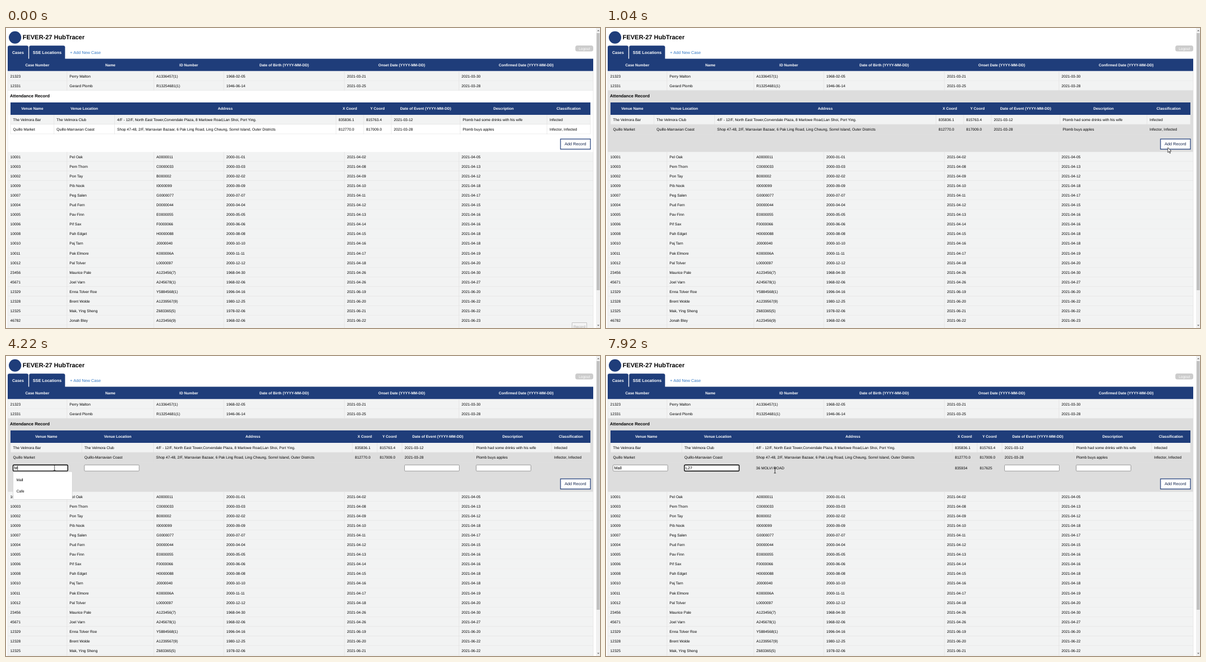
Animation, 1053 px wide and 532 px high, one loop 8000 ms. Source, as an HTML page with a canvas:

```html
<!DOCTYPE html>
<html lang="en">
<head>
<meta charset="utf-8">
<title>Case table</title>
<style>
html, body { margin: 0; width: 100%; height: 100%; overflow: hidden; background: #fff; }
canvas { display: block; }
</style>
</head>
<body>
<canvas id="stage" width="1053" height="532"></canvas>
<script>
const ctx = document.getElementById('stage').getContext('2d');
const LOOP = 8000, STEP = 70;
const NAVY = '#1f3d7a', ROW = '#f2f3f3', GRAY = '#ddd';
const SMALL = 6.58, MEDIUM = 7.31, ROW_H = 17.08;
const DETAIL_TOP = 110.7, FORM_TOP = 188.4, FORM_END = 209.6;

const caseEdges = [3, 108, 262, 386, 600, 803, 1041];
const caseHeads = ['Case Number', 'Name', 'ID Number', 'Date of Birth (YYYY-MM-DD)',
  'Onset Date (YYYY-MM-DD)', 'Confirmed Date (YYYY-MM-DD)'];
const cases = `21323|Perry Malton|A1336457(1)|1968-02-05|2021-03-21|2021-03-30
12331|Gerard Plomb|R13254681(1)|1946-06-14|2021-03-25|2021-03-28
10001|Pel Oak|A0000011|2000-01-01|2021-04-02|2021-04-05
10003|Pem Thorn|C0000033|2000-03-03|2021-04-08|2021-04-13
10002|Pon Tay|B000002|2000-02-02|2021-04-09|2021-04-12
10009|Pib Nook|I0000099|2000-09-09|2021-04-10|2021-04-18
10007|Peg Salen|G0000077|2000-07-07|2021-04-11|2021-04-17
10004|Pud Fern|D0000044|2000-04-04|2021-04-12|2021-04-15
10005|Pav Finn|E0000055|2000-05-05|2021-04-13|2021-04-16
10006|Pif Sax|F0000066|2000-06-06|2021-04-14|2021-04-16
10008|Pah Edget|H0000088|2000-08-08|2021-04-15|2021-04-18
10010|Paj Tarn|J0000040|2000-10-10|2021-04-16|2021-04-18
10011|Pak Elmore|K000006A|2000-11-11|2021-04-17|2021-04-19
10012|Pal Tolver|L0000097|2000-12-12|2021-04-18|2021-04-20
23456|Maurice Pale|A123456(7)|1968-04-30|2021-04-26|2021-04-30
45671|Joel Varn|A245678(1)|1968-02-06|2021-04-26|2021-04-27
12329|Enna Tolver Roe|Y5884568(1)|1996-04-16|2021-06-19|2021-06-20
12328|Brent Wolde|A1239567(9)|1980-12-25|2021-06-20|2021-06-22
12325|Mak, Ying Sheng|Z683365(5)|1978-02-06|2021-06-21|2021-06-22
46782|Jonah Bley|A123456(9)|1968-02-06|2021-06-22|2021-06-23
| | | | | `.split('\n').map(line => line.split('|'));

const venueHeads = ['Venue Name', 'Venue Location', 'Address', 'X Coord', 'Y Coord',
  'Date of Event (YYYY-MM-DD)', 'Description', 'Classification'];
const venues = [
  ['The Velmora Bar', 'The Velmora Club',
    '4/F - 12/F, North East Tower,Corvendale Plaza, 8 Marlowe Road,Lan Shoi, Port Ying.',
    '835836.1', '815763.4', '2021-03-12', 'Plomb had some drinks with his wife', 'Infected'],
  ['Quillo Market', 'Quillo-Marravian Coast',
    'Shop 47-48, 2/F, Marravian Bazaar, 6 Pak Ling Road, Ling Cheung, Sorrel Island, Outer Districts',
    '812770.0', '817009.0', '2021-03-28', 'Plomb buys apples', 'Infector, Infected']];
const closedEdges = [8, 85, 192.5, 585, 634, 683, 805, 959, 1036];
const openEdges = [8, 134.5, 261.5, 614, 658, 702, 829, 967, 1036];

// Pointer moves: start time, then one position per step.
const moves = [
  [270, [[785, 526], [800, 490], [816, 448], [832, 407], [852, 375], [872, 343], [892, 308],
    [912, 273], [929, 242], [952, 231], [977, 221], [996, 212]]],
  [1110, [[1003, 209], [1007, 208]]],
  [2240, [[1004, 211], [960, 214], [860, 208], [700, 196], [540, 184], [400, 177], [260, 173],
    [160, 178], [105, 187], [84.5, 192.3]]],
  [3140, [[86, 198]]],
  [7170, [[98, 202], [125, 210], [165, 216], [205, 217], [245, 213], [275, 208], [292, 204], [299.5, 203]]]];
const clicks = [[1440, 1520], [3070, 3140]];

// Form edits: time, field, value.
const edits = [[3290, 0, ''], [4220, 0, 'M'], [4490, 0, 'Ma'], [4620, 0, 'Mal'], [4820, 0, 'Mall'],
  [5030, 1, ''], [5760, 1, 'L'], [6160, 1, 'L2'], [6300, 1, 'L27']];
const popups = [[3350, 4290, 0, ['Mall', 'Cafe']], [4290, 4890, 0, ['Mall']], [5760, 6430, 1, ['L27']]];

function rect(x, y, x2, y2, color) {
  ctx.fillStyle = color;
  ctx.fillRect(x, y, x2 - x, y2 - y);
}

function box(x, y, x2, y2, radius, fill, stroke, width = 0.6) {
  ctx.beginPath();
  ctx.roundRect(x, y, x2 - x, y2 - y, radius);
  ctx.fillStyle = fill;
  ctx.fill();
  if (!stroke) return;
  ctx.strokeStyle = stroke;
  ctx.lineWidth = width;
  ctx.stroke();
}

function text(str, x, middle, { size = SMALL, bold = false, color = '#000', align = 'left' } = {}) {
  ctx.font = `${bold ? 'bold ' : ''}${size}px "Liberation Sans", Arial, sans-serif`;
  ctx.textRendering = 'geometricPrecision';
  ctx.textAlign = align;
  ctx.fillStyle = color;
  ctx.fillText(str, x, middle + size * 0.36);
}

function headRow(heads, edges, y, y2) {
  rect(edges[0], y, edges.at(-1), y2, NAVY);
  heads.forEach((head, i) => text(head, (edges[i] + edges[i + 1]) / 2, (y + y2) / 2,
    { bold: true, color: '#fff', align: 'center' }));
}

function bodyRow(cells, edges, y, fill) {
  const left = edges[0], right = edges.at(-1);
  if (fill) rect(left, y, right, y + ROW_H, fill);
  rect(left, y + ROW_H - 0.5, right, y + ROW_H, GRAY);
  edges.forEach(x => rect(x - 0.3, y, x + 0.3, y + ROW_H, GRAY));
  cells.forEach((cell, i) => text(cell, edges[i] + 4.6, y + ROW_H / 2));
}

function pointerAt(t) {
  const move = moves.findLast(([start]) => t >= start);
  if (!move) return null;
  const [start, points] = move;
  return points[Math.min(points.length - 1, Math.floor((t - start) / STEP))];
}

function drawPage(open) {
  box(5, 5.7, 27, 27.7, 11, NAVY);
  text('FEVER-27 HubTracer', 29.5, 16.4, { size: 10.97, bold: true });
  const tab = { size: MEDIUM * 0.96, bold: true, color: '#fff', align: 'center' };
  box(3, 31.2, 39.7, 55, [3, 3, 0, 0], NAVY);
  box(41, 31.2, 104.7, 55, [3, 3, 0, 0], NAVY);
  text('Cases', 21.3, 43, tab);
  text('SSE Locations', 73, 43, { ...tab, size: MEDIUM });
  text('+ Add New Case', 113.5, 43.2, { size: MEDIUM, color: '#3077c4' });
  box(1009.3, 31, 1041, 41.6, 3.5, '#ccc');
  text('Logout', 1025.2, 36.4, { color: '#fff', align: 'center' });

  rect(1046, 0, 1053, 532, '#f1f1f1');
  rect(1047, 9, 1052.5, open ? 450 : 465, '#c1c1c1');
  for (const [y, dir] of [[4.5, -1], [527.5, 1]]) {
    ctx.beginPath();
    ctx.moveTo(1048, y - dir);
    ctx.lineTo(1052, y - dir);
    ctx.lineTo(1050, y + dir);
    ctx.fillStyle = '#606060';
    ctx.fill();
  }
}

function drawCases(detailEnd, hoverY) {
  headRow(caseHeads, caseEdges, 54.5, 76.5);
  cases.forEach((cells, i) => {
    const y = i < 2 ? 76.6 + i * ROW_H : detailEnd + (i - 2) * ROW_H;
    const hovered = hoverY >= y && hoverY < y + ROW_H;
    bodyRow(cells, caseEdges, y, hovered ? GRAY : ROW);
  });
}

function drawForm(t, x, hoverY) {
  if (hoverY < FORM_TOP || hoverY >= FORM_END) rect(8, FORM_TOP, 1036, FORM_END, ROW);
  const current = edits.findLast(([time]) => t >= time);
  [0, 1, 5, 6].forEach(column => {
    const left = openEdges[column] + 4.5;
    const focused = current && current[1] === column;
    box(left, 193.2, left + 97, 204, 1.3, '#fff', focused ? '#000' : '#767676', focused ? 1.4 : 0.7);
    const value = edits.findLast(([time, field]) => t >= time && field === column)?.[2] ?? '';
    text(value, left + 2, 198.6, { size: MEDIUM });
    if (focused && (t - current[0]) % 1060 < 530) {
      const caret = left + 2 + ctx.measureText(value).width;
      rect(caret, 194.5, caret + 0.6, 202.8, '#000');
    }
  });
  if (t >= 7100) {
    ['36 MOLVI ROAD', '835934', '817625'].forEach((s, i) => text(s, openEdges[i + 2] + 4.6, 198.5));
  }
}

function drawDetail(t, open, detailEnd, hovered, hoverY) {
  if (hovered) rect(3, DETAIL_TOP, 1041, detailEnd, GRAY);
  rect(2.7, DETAIL_TOP, 3.3, detailEnd, GRAY);
  rect(1040.7, DETAIL_TOP, 1041.3, detailEnd, GRAY);
  text('Attendance Record', 7, 120.2, { size: 7.68, bold: true });
  const edges = open ? openEdges : closedEdges;
  headRow(venueHeads, edges, 132, 154);
  venues.forEach((cells, i) => bodyRow(cells, edges, 154 + i * ROW_H, i ? null : ROW));
  if (open) drawForm(t, edges, hoverY);
  const y = detailEnd - 23;
  box(983, y, 1036, y + 18, 0, '#fff', NAVY, 1.2);
  text('Add Record', 1009.4, y + 9, { size: MEDIUM, color: '#10234c', align: 'center' });
}

function drawPopup(t) {
  const popup = popups.find(([from, to]) => t >= from && t < to);
  if (!popup) return;
  const [, , field, items] = popup;
  const left = openEdges[field] + 4.5;
  box(left, 205, left + 105, 214.5 + items.length * 20, 1.5, '#fff', '#c8c8c8');
  items.forEach((item, i) => text(item, left + 6, 219.5 + i * 20));
}

function drawPointer(t, x, y) {
  if (clicks.some(([from, to]) => t >= from && t < to)) {
    box(x - 7, y - 7, x + 7, y + 7, 7, 'rgba(232, 214, 30, 0.75)');
  }
  ctx.lineWidth = 0.7;
  ctx.strokeStyle = '#000';
  const overText = t >= 3140 && t < 7310 || t >= 7590;
  if (overText) {
    ctx.beginPath();
    for (const end of [-4.6, 4.6]) {
      ctx.moveTo(x - 1.8, y + end);
      ctx.lineTo(x + 1.8, y + end);
    }
    ctx.moveTo(x, y - 4.6);
    ctx.lineTo(x, y + 4.6);
    ctx.stroke();
    return;
  }
  const arrow = new Path2D('M0 0V8.8L2 7L3.5 10.2L4.7 9.7L3.3 6.5L6 6.2Z');
  ctx.save();
  ctx.translate(x, y);
  ctx.fillStyle = '#fff';
  ctx.fill(arrow);
  ctx.stroke(arrow);
  ctx.restore();
}

function draw(t) {
  const open = t >= 1780;
  const detailEnd = open ? 240.8 : 219.8;
  const pointer = pointerAt(t);
  const hoverY = pointer ? pointer[1] + 1 : -1;
  const hovered = hoverY >= DETAIL_TOP && hoverY < detailEnd;
  rect(0, 0, 1053, 532, '#fff');
  drawPage(open);
  drawCases(detailEnd, hoverY);
  drawDetail(t, open, detailEnd, hovered, hoverY);
  drawPopup(t);
  if (t < 70) {
    box(1003.5, 522.5, 1029.5, 536, 0, '#f4f4f4', '#c4c4c4', 1);
    text('Record', 1016.5, 530, { color: '#aaa', align: 'center' });
  }
  if (pointer) drawPointer(t, ...pointer);
}

const started = performance.now();
function tick() {
  draw((performance.now() - started) % LOOP);
  requestAnimationFrame(tick);
}
tick();
</script>
</body>
</html>
```
